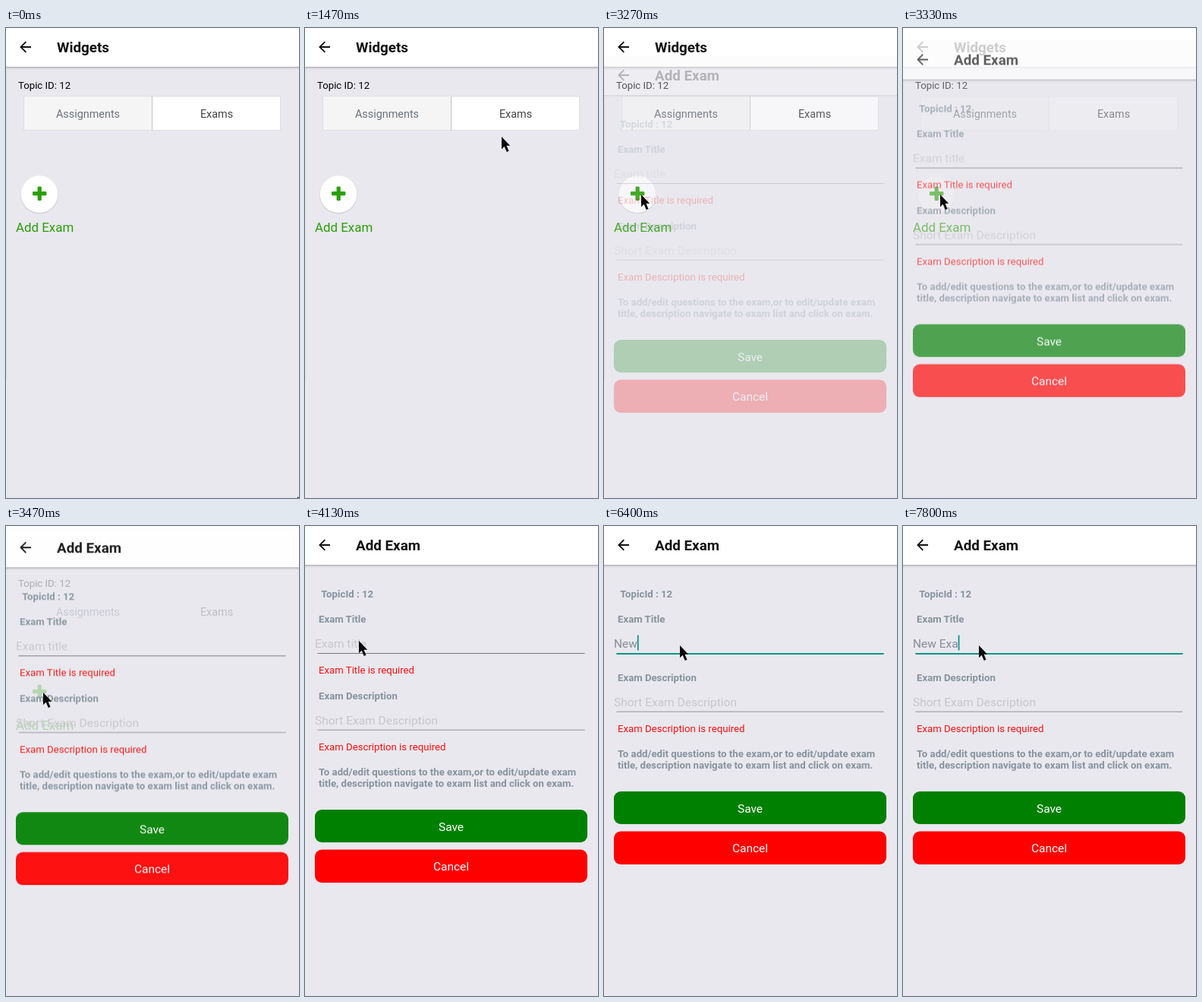
An HTML page that plays this animation: 386x618 px, repeating every 8000 ms.

```html
<!DOCTYPE html>
<html lang="en">
<head>
<meta charset="utf-8">
<title>Add exam</title>
<style>
html, body { margin: 0; height: 100%; overflow: hidden; background: #e9e8ee; }
svg { display: block; width: 100vw; height: 100vh; font: 13.2px Roboto, sans-serif; }
text { white-space: pre; }
.title { font-size: 18.8px; font-weight: 700; fill: #111; }
.tab { font-size: 14.4px; text-anchor: middle; }
.label { font-weight: 700; fill: #86939e; }
.input { font-size: 15.5px; fill: #c6c6cb; }
.error { fill: #fb1010; }
.button { font-size: 15.5px; fill: #fff; text-anchor: middle; }
.green { fill: #2a9f08; }
</style>
</head>
<body>
<svg viewBox="0 0 386 618">
  <defs>
    <linearGradient id="shade" x2="0" y2="1">
      <stop stop-opacity=".3"/><stop offset=".4" stop-opacity=".1"/><stop offset="1" stop-opacity="0"/>
    </linearGradient>
    <g id="bar">
      <rect width="386" height="51" fill="#fff"/>
      <rect y="51" width="386" height="4" fill="url(#shade)"/>
      <path d="M33 25H20M26.3 18.2L19.5 25l6.8 6.8" fill="none" stroke="#111" stroke-width="1.9"/>
    </g>
  </defs>

  <rect width="386" height="618" fill="#e9e8ee"/>
  <g id="widgets">
    <rect y="55" width="1.5" height="407" fill="#e3e2e8"/>
    <use href="#bar"/>
    <text class="title" x="67" y="32.2">Widgets</text>
    <text x="16" y="79.7">Topic ID: 12</text>
    <g id="panels">
      <rect x="23.5" y="90" width="338" height="44.5" fill="#fff" stroke="#dddde2"/>
      <rect x="24" y="90.5" width="168" height="43.5" fill="#f5f5f5"/>
      <path d="M192.5 90V134.5" stroke="#c2c5d0"/>
      <circle cx="44" cy="219.3" r="25" opacity=".1"/>
      <circle cx="44" cy="218.5" r="24.4" fill="#fff"/>
    </g>
    <text class="tab" x="108" y="118.2" fill="#6a717b">Assignments</text>
    <text class="tab" x="277.5" y="118.2" fill="#444">Exams</text>
    <rect class="green" x="35" y="215" width="18.4" height="5.2" rx="1.3"/>
    <rect class="green" x="41.6" y="208.5" width="5.2" height="18.4" rx="1.3"/>
    <text class="green" x="13" y="268" font-size="16.9">Add Exam</text>
  </g>

  <g id="form">
    <rect id="back" width="386" height="618" fill="#e9e8ee"/>
    <g id="content">
      <use href="#bar"/>
      <text class="title" x="67" y="32.2">Add Exam</text>
      <text class="label" x="21.3" y="93.5">TopicId : 12</text>
      <text class="label" x="18" y="127">Exam Title</text>
      <text class="input" id="name" x="13" y="160">Exam title</text>
      <rect x="16.5" y="167" width="352" height="1" fill="#77777b"/>
      <rect id="focus" x="16.5" y="167" width="352" height="2" fill="#009688"/>
      <rect id="caret" y="143.5" width="1.7" height="20" fill="#009688"/>
      <text class="error" id="missing" x="18" y="194.2">Exam Title is required</text>
      <g id="lower">
        <text class="label" x="18" y="227.7">Exam Description</text>
        <text class="input" x="13" y="260.5">Short Exam Description</text>
        <rect x="16.5" y="267.7" width="352" height="1" fill="#929297"/>
        <text class="error" x="18" y="294.7">Exam Description is required</text>
        <text class="label" x="18" y="328">To add/edit questions to the exam,or to edit/update exam</text>
        <text class="label" x="18" y="343.3">title, description navigate to exam list and click on exam.</text>
        <rect x="13" y="373" width="359" height="43" rx="9" fill="#008000"/>
        <text class="button" x="192.5" y="400.5">Save</text>
        <rect x="13" y="425.5" width="359" height="43.5" rx="9" fill="#f00"/>
        <text class="button" x="192.5" y="453.3">Cancel</text>
      </g>
    </g>
  </g>

  <path id="cursor" d="M0 0V16.2L3.6 12.8 6.8 20 9.5 18.8 6.5 11.8H11.2Z" fill="#0a0a0a"/>
</svg>
<script>
const LOOP = 8000, FPS = 15;
const $ = id => document.getElementById(id);
const show = (id, on) => $(id).setAttribute('visibility', on ? 'inherit' : 'hidden');
const move = (id, x, y) => $(id).setAttribute('transform', `translate(${x} ${y})`);
const fade = (id, a) => $(id).setAttribute('opacity', a);

// Pointer path: tick, x, y
const path = [
  [0, 384, 616], [1, 383, 607], [3, 381, 589], [4, 383, 591], [5, 395, 585], [6, 395, 520],
  [7, 380, 506], [12, 322, 270], [18, 273, 134], [19, 273, 134], [20, 268, 137], [22, 259, 143],
  [25, 222, 156], [29, 123, 198], [32, 83, 213], [36, 49, 219], [53, 49, 219], [57, 68, 170],
  [60, 68, 170], [61, 70, 159], [62, 71, 151], [75, 71, 151], [78, 100, 157], [120, 100, 157]
];
const typed = 'New Exa', keyTicks = [88, 93, 96, 99, 108, 113, 117];

function pointer(n) {
  const i = path.findIndex(k => k[0] > n);
  const [t0, x0, y0] = path[i - 1], [t1, x1, y1] = path[i];
  const u = (n - t0) / (t1 - t0);
  return [Math.round(x0 + (x1 - x0) * u), Math.round(y0 + (y1 - y0) * u)];
}

function draw(t) {
  const n = Math.floor((t + 5) * FPS / 1000) % (LOOP * FPS / 1000);
  move('cursor', ...pointer(n));

  // The form slides up while it fades in
  const step = n - 49;
  const lift = step < 5 ? 37 * 0.446 ** step : 0;
  const alpha = step < 0 ? 0 : 1 - lift / 49;
  show('form', step >= 0);
  move('form', 0, step < 0 ? 0 : lift);
  fade('content', alpha);
  fade('back', 1 - Math.sqrt(1 - alpha));
  fade('panels', 1 - alpha);
  show('widgets', alpha < 1);

  // Focus, caret and typing
  fade('focus', n < 67 ? 0 : n < 68 ? 0.4 : n < 70 ? 0.7 : 1);
  const count = keyTicks.filter(k => k <= n).length;
  const name = $('name');
  name.textContent = count ? typed.slice(0, count) : 'Exam title';
  name.style.fill = count ? '#878c94' : '';
  $('caret').setAttribute('x', 13 + (count ? name.getComputedTextLength() : 0));
  show('caret', n >= 84 || n >= 68 && n < 76);
  show('missing', n < 90);
  move('lower', 0, n < 90 ? 0 : -24);
}

const start = performance.now();
function tick() {
  draw((performance.now() - start) % LOOP);
  requestAnimationFrame(tick);
}
tick();
</script>
</body>
</html>
```
